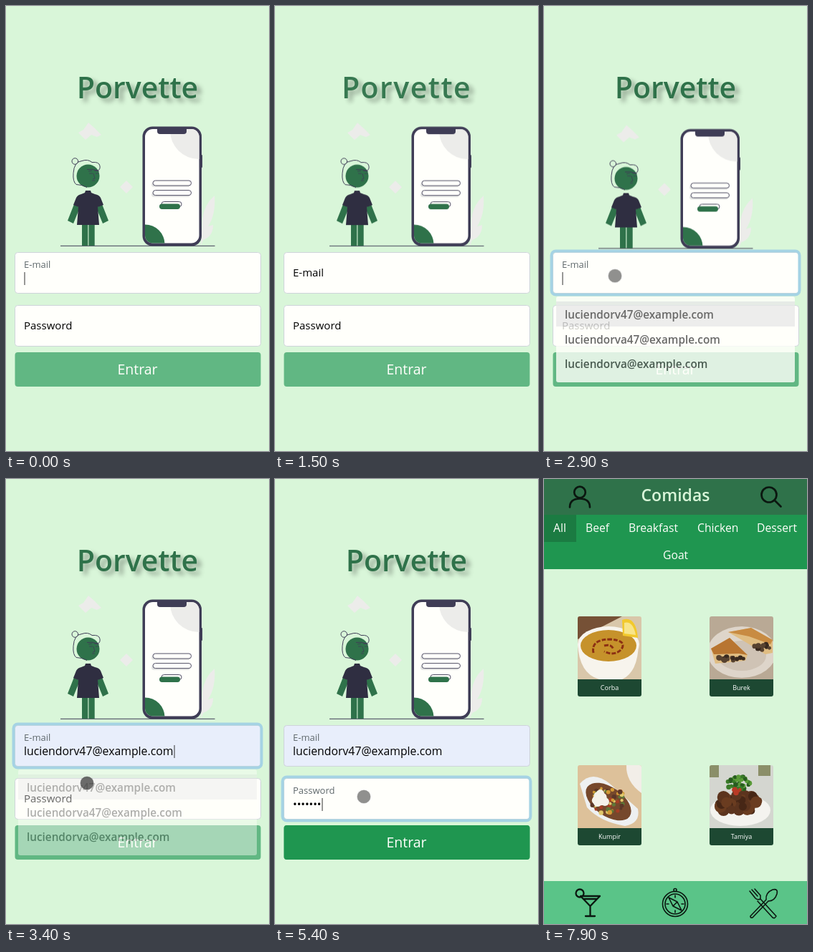
Write an HTML page that moves like this. It is 367 by 622 pixels and loops after 8 s.

```html
<!DOCTYPE html>
<html lang="pt">
<head>
<meta charset="utf-8">
<title>Login</title>
<style>
html, body { margin: 0; width: 100%; height: 100%; overflow: hidden; background: #d9f6d9; }
svg { display: block; width: 367px; height: 622px; font: 500 15px "Open Sans", "Noto Sans", sans-serif; }
.small { font-size: 13px; fill: #5f686c; }
.value { font-size: 15.8px; }
.mid { text-anchor: middle; }
.ink { fill: none; stroke: #3f3d56; }
.icon { fill: none; stroke: #0b1710; stroke-linecap: round; stroke-linejoin: round; }
.field { fill: #fffffb; stroke: #ced4da; }
.ring { fill: none; stroke: #a5d3e4; stroke-width: 4; }
.caret { stroke: #333; }

/* Every track shares one 8 s clock: 1% = 80 ms. */
.cut { animation: var(--k) 8s step-end infinite; }
.run { animation: var(--k) 8s linear infinite; }

@keyframes login { 0% { opacity: 1 } 83.75% { opacity: 0 } }
@keyframes loading { 0% { opacity: 0 } 83.75% { opacity: 1 } 95% { opacity: 0 } }
@keyframes menu { 0% { opacity: 0 } 95% { opacity: 1 } }
@keyframes dishes { 0% { opacity: 0 } 96.25% { opacity: 1 } }
@keyframes emailIdle { 0% { opacity: 0 } 1.25% { opacity: 1 } 32.5% { opacity: 0 } }
@keyframes emailUsed { 0% { opacity: 1 } 1.25% { opacity: 0 } 32.5% { opacity: 1 } }
@keyframes emailFilled { 0% { opacity: 0 } 40% { opacity: 1 } }
@keyframes emailCaret {
  0% { opacity: 1; transform: none } 1.25% { opacity: 0 } 32.5% { opacity: 1; transform: none }
  40% { opacity: 1; transform: translateX(209px) } 50% { opacity: 0 }
}
@keyframes passIdle { 0% { opacity: 1 } 50% { opacity: 0 } }
@keyframes passUsed { 0% { opacity: 0 } 50% { opacity: 1 } }
@keyframes ready { 0% { opacity: 0 } 65% { opacity: 1 } }
@keyframes emailRing { 0%, 32.5% { opacity: 0 } 34%, 50% { opacity: 1 } 51.5%, 100% { opacity: 0 } }
@keyframes passRing { 0%, 50% { opacity: 0 } 51.5%, 100% { opacity: 1 } }
@keyframes options { 0%, 32.5% { opacity: 0 } 33.75%, 41.25% { opacity: 1 } 44%, 100% { opacity: 0 } }
@keyframes typeDots {
  0%, 57.5% { clip-path: inset(0 100% 0 0); animation-timing-function: steps(7) }
  66.25%, 100% { clip-path: inset(0 0 0 0) }
}
@keyframes typeCaret {
  0%, 57.5% { transform: none; animation-timing-function: steps(7) }
  66.25%, 100% { transform: translateX(40px) }
}
@keyframes bob {
  0%, 1.24% { transform: none; animation-timing-function: step-end }
  1.25% { transform: translateY(5px); animation-timing-function: ease-out }
  5%, 30%, 55% { transform: translateY(7px); animation-timing-function: ease-in-out }
  17.5%, 42.5%, 67.5% { transform: none; animation-timing-function: ease-in-out }
  70%, 100% { transform: translateY(.5px) }
}
@keyframes track {
  0%, 1.24% { letter-spacing: 0 }
  1.25% { letter-spacing: 1em; animation-timing-function: cubic-bezier(.215, .61, .355, 1) }
  26.25%, 100% { letter-spacing: 0 }
}
@keyframes appear {
  0%, 1.24% { opacity: 1 }
  1.25% { opacity: 0; animation-timing-function: cubic-bezier(.215, .61, .355, 1) }
  11.25% { opacity: .6; animation-timing-function: cubic-bezier(.215, .61, .355, 1) }
  26.25%, 100% { opacity: 1 }
}
@keyframes glow { 0%, 83.75% { opacity: .02 } 85% { opacity: .1 } 95%, 100% { opacity: .85 } }
@keyframes point {
  0%, 20% { transform: translate(-12px, -12px); animation-timing-function: ease-out }
  28.75%, 33.75% { transform: translate(92px, 353px); animation-timing-function: ease-in-out }
  40%, 43.75% { transform: translate(113px, 425px); animation-timing-function: ease-in-out }
  48.75%, 76.25% { transform: translate(124px, 444px) }
  78.75%, 80% { transform: translate(127px, 474px) }
  81.25%, 100% { transform: translate(167px, 512px) }
}
@keyframes press {
  0% { fill-opacity: .57 } 32.5% { fill-opacity: .75 } 33.75% { fill-opacity: .57 }
  40% { fill-opacity: .75 } 43.75% { fill-opacity: .57 } 50% { fill-opacity: .75 }
  51.25% { fill-opacity: .57 }
}
@keyframes pointerOn { 0% { opacity: 0 } 20% { opacity: 1 } 95% { opacity: 0 } }

#brand {
  font-size: 41px; font-weight: 600; fill: #2f724a;
  filter: drop-shadow(6px 5px 3px #0005);
  animation: track 8s linear infinite, appear 8s linear infinite;
}
</style>
</head>
<body>
<svg viewBox="0 0 367 622">
  <defs>
    <clipPath id="screen"><rect x="194" y="172" width="75.5" height="159.5" rx="11"/></clipPath>
    <clipPath id="photo"><path d="M0 88V3q0-3 3-3H86q3 0 3 3V88z"/></clipPath>
    <path id="bird" d="M-10 0q6-1 9-1 3-5 11-6-5 3-5 7-1 5-6 6l2-3q-4-2-11-3z" fill="#3f4058"/>
    <path id="zed" d="M-5-5H5L-5 5H5" fill="none" stroke="#7b8a83" stroke-width="1.3"/>
  </defs>
  <rect width="367" height="622" fill="#d9f6d9"/>

  <g class="cut" style="--k:login">
    <text id="brand" class="mid" x="183.5" y="129">Porvette</text>

    <g class="run" style="--k:bob">
      <g fill="#ececea">
        <path d="M101 177l7-4 7-10 9 8 9 9-6 3-8-3-8 7z"/>
        <path d="M168 244l9 9-9 9-9-9z"/>
        <path d="M291 265q-14 12-17 32l-2 38 3-8q14-5 14-21l-7 2q11-17 9-43z"/>
      </g>
      <path class="ink" d="M76 335.3H291.5"/>
      <rect x="270" y="208" width="4" height="18" rx="1" fill="#3f3d56"/>
      <rect x="190.5" y="168.5" width="82.5" height="167" rx="14" fill="#3f3d56"/>
      <g clip-path="url(#screen)">
        <rect x="190" y="168" width="84" height="168" fill="#fffffb"/>
        <circle cx="269" cy="174" r="40" fill="#ececea"/>
        <circle cx="194" cy="333" r="27.5" fill="#2f724a"/>
      </g>
      <path d="M211 171h41v4q0 4-4 4h-33q-4 0-4-4z" fill="#3f3d56"/>
      <g fill="#e4e5e3"><rect x="203" y="246" width="54" height="7" rx="3.5"/><rect x="203" y="260" width="54" height="7" rx="3.5"/></g>
      <g class="ink" stroke-width=".9">
        <rect x="205" y="244" width="53.5" height="7" rx="3.5" fill="#fffffb"/>
        <rect x="205" y="257.6" width="53.5" height="7" rx="3.5" fill="#fffffb"/>
        <rect x="217" y="273.5" width="28" height="7" rx="3.5"/>
      </g>
      <rect x="214" y="276.5" width="29" height="7.5" rx="3.7" fill="#2f724a"/>

      <g fill="#2f724a">
        <circle cx="114.5" cy="237.5" r="16"/>
        <path d="M95 277l-9 23 8 4 9-22zM134 277l9 23-8 4-9-22zM106 305h8.3v30H106zM115.4 305h8.3v30h-8.3z"/>
      </g>
      <path d="M111 258h7l1 3 5 2q6 1 8 5l4 10-8 3 2 25H99l2-25-7-3 4-10q2-4 7-5l5-2z" fill="#2f2e41"/>
      <g class="ink">
        <circle cx="96.3" cy="217" r="4.3"/>
        <path d="M113 253.5q-7-4-15-4-5-4-4-16 1-16 12-17 8-3 14 2 10-1 11 5 1 7-5 6-6-2-13-1"/>
        <path d="M115 231l5-1M123 230l7 1M116 234h5M125 234h4M122 234l2 7-3 1M120 244h4" stroke-width=".8"/>
      </g>
    </g>

    <rect class="field" x="12.5" y="344.5" width="343" height="57" rx="4"/>
    <rect class="cut field" style="--k:emailFilled;fill:#e8eefb" x="12.5" y="344.5" width="343" height="57" rx="4"/>
    <rect class="run ring" style="--k:emailRing" x="10.5" y="342.5" width="346" height="61" rx="6"/>
    <text class="cut" style="--k:emailIdle" x="25" y="378">E-mail</text>
    <text class="cut small" style="--k:emailUsed" x="25" y="366">E-mail</text>
    <text class="cut value" style="--k:emailFilled" x="25" y="386">luciendorv47@example.com</text>
    <path class="cut caret" style="--k:emailCaret" d="M26 372v18"/>

    <rect class="field" x="12.5" y="418.5" width="343" height="57" rx="4"/>
    <rect class="run ring" style="--k:passRing" x="10.5" y="416.5" width="346" height="61" rx="6"/>
    <text class="cut" style="--k:passIdle" x="25" y="452">Password</text>
    <g class="cut" style="--k:passUsed">
      <text class="small" x="25" y="440">Password</text>
      <text class="run" style="--k:typeDots" x="25" y="460">•••••••</text>
      <path class="run caret" style="--k:typeCaret" d="M26 446v18"/>
    </g>

    <rect x="12.5" y="484" width="343" height="48" rx="4" fill="#61b783"/>
    <rect class="cut" style="--k:ready" x="12.5" y="484" width="343" height="48" rx="4" fill="#1f9650"/>
    <text class="mid" x="183.5" y="515" font-size="19.5" fill="#fffffb">Entrar</text>

    <g class="run" style="--k:options">
      <g opacity=".8">
        <rect x="17" y="406" width="333" height="120" rx="3" fill="#fffffb"/>
        <path d="M17 413h333v35H17z" fill="#e9e9e9"/>
        <g font-weight="600" font-size="15.3" fill="#444">
          <text x="29" y="437">luciendorv47@example.com</text>
          <text x="29" y="472">luciendorva47@example.com</text>
          <text x="29" y="506">luciendorva@example.com</text>
        </g>
      </g>
    </g>
  </g>

  <g class="cut" style="--k:loading">
    <g fill="#e1e3e0">
      <circle cx="160.7" cy="203" r="92"/>
      <path d="M159 290h4l1 57 11-5 1 3-12 8 1 98h-8z"/>
    </g>
    <use href="#bird" x="221" y="160"/><use href="#bird" x="291" y="132.5"/><use href="#bird" x="271" y="216.5"/>
    <use href="#zed" x="227" y="364"/><use href="#zed" x="233" y="381"/><use href="#zed" x="219" y="396"/>
    <path d="M62 451.7H306" stroke="#3f3d56" stroke-width="1.6"/>
    <g fill="#2f2e41">
      <circle cx="185" cy="425" r="27.5"/>
      <path d="M180 446q15 5 24-3 5 3 5-4 3-5 5 3 3-9 5 1 2 9-2 9h-37zM171 447q3 12 7 14 4 0 3-11z"/>
    </g>
    <path d="M158 394c1-22 36-24 40-1 1 9-6 11-15 11-11 1-15 5-20 3q-5-4-5-13z" fill="#2f724a"/>
    <path d="M189 417q1 6 7 5 6-1 6-8" fill="none" stroke="#fff" stroke-width="1.2"/>
    <ellipse cx="202" cy="431" rx="6" ry="5" fill="#fff" transform="rotate(-20 202 431)"/>
    <text class="run" style="--k:glow;font:40px Roboto,sans-serif;letter-spacing:3px" x="111" y="501" fill="#2f4a3a">Loading</text>
  </g>

  <g class="cut" style="--k:menu">
    <path d="M0 0h367v50H0z" fill="#2f724a"/>
    <text class="mid" x="183.5" y="31" font-size="23" font-weight="600" fill="#d9f6d9">Comidas</text>
    <g class="icon" stroke-width="2.7">
      <circle cx="50" cy="18.5" r="7.8"/><path d="M36 39.5q0-12 14-12t14 12"/>
      <circle cx="314" cy="22" r="10.5"/><path d="M322 30l8.5 8.5"/>
    </g>
    <path d="M0 50h367v76H0z" fill="#1f9650"/>
    <path d="M0 50h45v38H0z" fill="#1b7b42"/>
    <g fill="#fffffb" font-size="15.7">
      <text x="13" y="74">All</text><text x="58" y="74">Beef</text><text x="118" y="74">Breakfast</text>
      <text x="214" y="74">Chicken</text><text x="297" y="74">Dessert</text><text x="166" y="112">Goat</text>
    </g>
    <path d="M0 562h367v60H0z" fill="#5ac488"/>
    <g class="icon" stroke-width="2.3">
      <path d="M51 583H78L64.5 597zM64.5 597v13M58 611h13M55 587h19"/><circle cx="50" cy="579" r="5.5"/>
    </g>
    <g class="icon" stroke-width="1.6">
      <circle cx="183" cy="594" r="17.5"/><circle cx="183" cy="594" r="14"/><circle cx="183" cy="574.5" r="2"/>
      <path d="M174 585l12 6 6 12-12-6zM180 597l6-6M183 582v3M183 603v3M171 594h3M192 594h3"/>
      <path d="M288 611l22-23M291 613l22-23M288 611q0 3 3 2M310 588q-1-10 9-14 8-2 6 6-3 10-12 10"/>
      <path d="M287 576l8 10q3 3 7 1l22 24q-2 4-5 2l-21-23M290 574l8 9M294 573l8 9v5"/>
    </g>

    <g class="cut" style="--k:dishes">
      <g id="corba" transform="translate(47 192)">
        <g clip-path="url(#photo)">
          <path d="M0 0h89v88H0z" fill="#d9c7aa"/><path d="M0 0h62L0 32z" fill="#765136"/>
          <path d="M0 38q2 42 30 50h32q22-10 23-50z" fill="#f7f4ed"/>
          <ellipse cx="43" cy="39" rx="43" ry="25" fill="#f7f4ed"/>
          <ellipse cx="43" cy="41" rx="39" ry="22" fill="#c6922b"/>
          <path d="M22 51q-4-19 24-19 23 2 15 14-9 10-24 3M37 41q10-3 13 5" fill="none" stroke="#8c3013" stroke-width="3" stroke-dasharray="6 2"/>
          <path d="M62 5q19-7 22 25l-21-3z" fill="#f2c92d"/><path d="M65 9q12-3 16 17l-16-2z" fill="#f8e58a"/>
        </g>
      </g>
      <g id="burek" transform="translate(231 192)">
        <g clip-path="url(#photo)">
          <path d="M0 0h89v88H0z" fill="#b9a995"/><ellipse cx="45" cy="50" rx="48" ry="36" fill="#ded5ca"/>
          <ellipse cx="45" cy="55" rx="34" ry="21" fill="#cfc3b5"/>
          <path d="M26 22l32-6 30 17v18l-10 2-26-16z" fill="#e0bd82"/><path d="M26 22l32-6 30 17-3 6-30-11z" fill="#c88b42"/>
          <path d="M2 45l26-15 25 24-3 8-42 4z" fill="#e0bd82"/><path d="M2 45l26-15 25 24-12-2-35 1z" fill="#b87531"/>
        </g>
      </g>
      <g id="kumpir" transform="translate(47 400)">
        <g clip-path="url(#photo)">
          <path d="M0 0h89v88H0z" fill="#ddc19a"/><path d="M68 0h21v39Q67 23 68 0z" fill="#f2eee8"/>
          <path d="M3 26q17-20 42 0l39 35q4 20-18 24-35-6-53-26z" fill="#eef0f1"/>
          <ellipse cx="43" cy="51" rx="36" ry="20" transform="rotate(35 43 51)" fill="#76482c"/>
        </g>
      </g>
      <g id="tamiya" transform="translate(231 400)">
        <g clip-path="url(#photo)">
          <path d="M0 0h89v88H0z" fill="#d4d6d0"/><path d="M0 0h13v17H0zM68 0h17v15H68z" fill="#8b8f69"/>
          <ellipse cx="43" cy="63" rx="42" ry="22" fill="#f4f3ef"/>
        </g>
      </g>
    </g>
  </g>

  <g class="cut" style="--k:pointerOn">
    <g class="run" style="--k:point">
      <circle class="cut" style="--k:press" r="9.6" fill="#3c3c3c" stroke="#fff" stroke-opacity=".4"/>
    </g>
  </g>
</svg>

<script>
let seed = 7;
const random = () => (seed = seed * 16807 % 2147483647) / 2147483647;

function add(parent, tag, attrs, text = '') {
  const el = document.createElementNS('http://www.w3.org/2000/svg', tag);
  for (const key in attrs) el.setAttribute(key, attrs[key]);
  el.textContent = text;
  parent.append(el);
}

// Scatters round morsels over an ellipse on a dish.
function scatter(id, count, [cx, cy, rx, ry], size, colors) {
  const photo = document.querySelector(`#${id} > g`);
  for (let i = 0; i < count; i++) {
    const angle = random() * Math.PI * 2, reach = Math.sqrt(random());
    add(photo, 'circle', {
      cx: cx + rx * reach * Math.cos(angle),
      cy: cy + ry * reach * Math.sin(angle),
      r: size * (.7 + random() * .6),
      fill: colors[i % colors.length]
    });
  }
}

scatter('burek', 18, [29, 59, 19, 3], 3, ['#38291f', '#574230']);
scatter('burek', 14, [72, 42, 13, 5], 3, ['#38291f', '#574230']);
scatter('kumpir', 60, [42, 49, 25, 19], 2.5, ['#d29a35', '#a73e25', '#5d7838', '#e0c66b', '#5b3728']);
scatter('kumpir', 9, [32, 47, 8, 7], 5, ['#f5f2ea']);
scatter('tamiya', 40, [41, 55, 29, 16], 7.5, ['#5c341e', '#6a3c20', '#472716']);
scatter('tamiya', 38, [40, 25, 17, 10], 3, ['#397b28', '#5a9b38', '#285c20']);
scatter('tamiya', 5, [39, 36, 6, 3], 3, ['#b93a25']);

for (const [id, name] of [['corba', 'Corba'], ['burek', 'Burek'], ['kumpir', 'Kumpir'], ['tamiya', 'Tamiya']]) {
  const card = document.getElementById(id);
  add(card, 'path', { d: 'M0 88h89v21q0 3-3 3H3q-3 0-3-3z', fill: '#1d4832' });
  add(card, 'text', { x: 44.5, y: 103, class: 'mid', 'font-size': 9, fill: '#fff' }, name);
}
</script>
</body>
</html>
```
